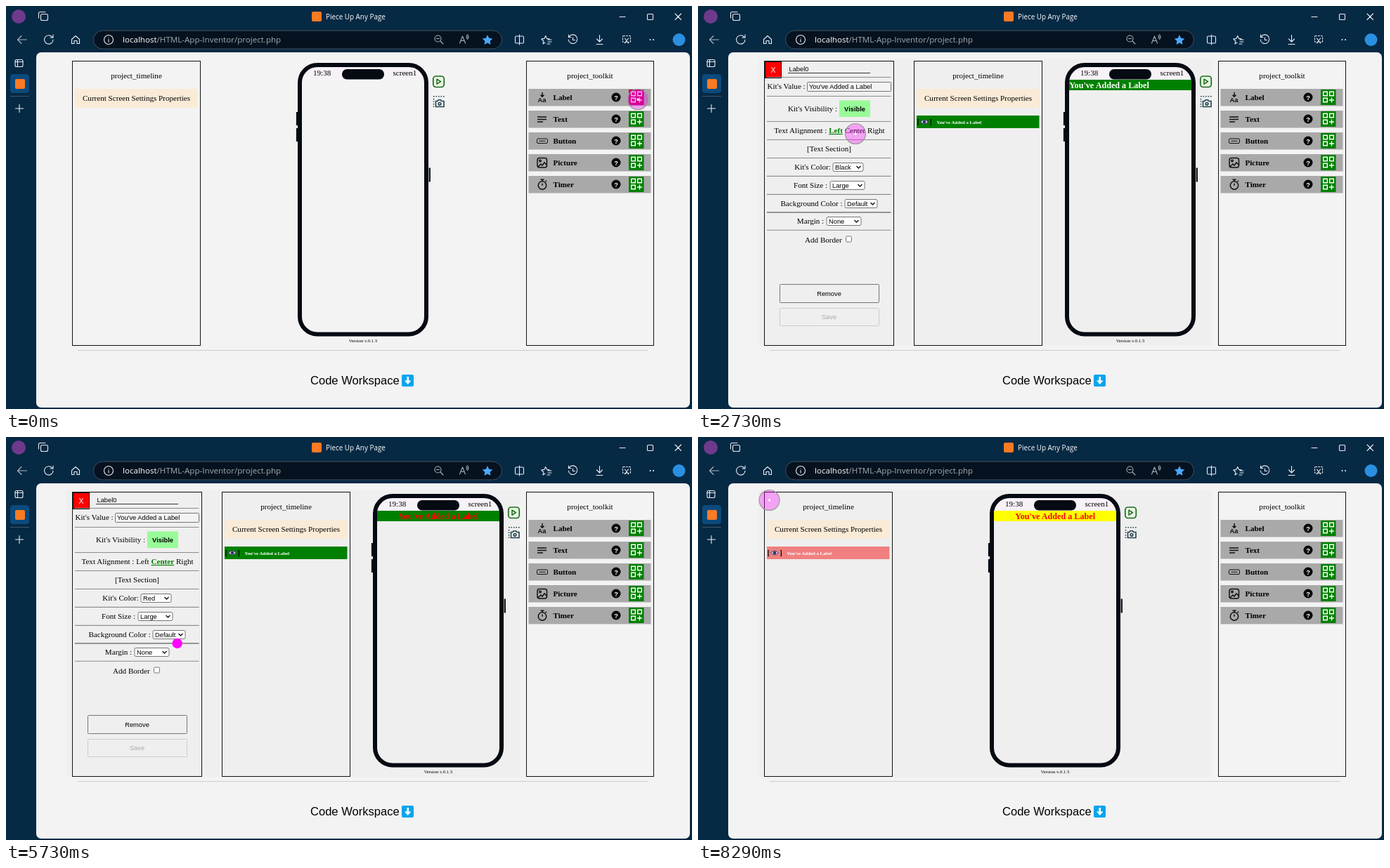
An HTML page for the animation above (8900 ms loop, 976 by 574 pixels).

```html
<!DOCTYPE html>
<html lang="en">
<head>
<meta charset="utf-8">
<title>Screen builder demo</title>
<style>
html, body { margin: 0; width: 100%; height: 100%; overflow: hidden; background: #062944; }
svg { display: block; width: 976px; height: 574px; }
text { white-space: pre; }
.ui { font-family: "Open Sans", "Noto Sans", sans-serif; fill: #fff; }
.serif { font: 11.1px "Liberation Serif", "Times New Roman", serif; }
.sans { font: 9.3px "Liberation Sans", Arial, sans-serif; }
.mid { text-anchor: middle; }
.b { font-weight: bold; }
.line { fill: none; stroke: #e8eef3; stroke-width: 1.1; stroke-linecap: round; stroke-linejoin: round; }
.dim { stroke: #aab3ba; }
.box { fill: none; stroke: #111; }
.rule { stroke: #8c8c8c; }
.field { fill: #fff; stroke: #767676; }
.focus { stroke: #101010; stroke-width: 2; }
.on { fill: green; font-weight: bold; text-decoration: underline; }
.menu { filter: drop-shadow(0 8px 9px rgba(0,0,0,.22)); }
</style>
</head>
<body>
<svg viewBox="0 0 976 574" xmlns="http://www.w3.org/2000/svg">
  <!-- browser frame -->
  <circle cx="18" cy="15" r="10" fill="#6e3a8c"/>
  <g class="line">
    <rect x="49.5" y="11.5" width="10" height="9" rx="2"/>
    <path d="M46.5 17v-6.500q0-2 2-2H56"/>
    <path d="M873 15.5h8M952 11l8.500 8.500m0-8.500-8.500 8.500"/>
    <rect x="912.5" y="11.5" width="8" height="8" rx="1"/>
    <path class="dim" d="M29.5 48h-13m5.500-5.500-5.500 5.500 5.500 5.500"/>
    <path d="M66 44.500a6.200 6.200 0 1 0 1 3.500M67 41v4h-4"/>
    <path d="M93.500 47.500l5.500-5 5.500 5v6h-3.500v-4h-4v4h-3.500z"/>
  </g>
  <rect x="435" y="8" width="14" height="14" rx="2" fill="#fb7a24"/>
  <text class="ui" x="455" y="19" font-size="9.9">Piece Up Any Page</text>
  <rect x="124.5" y="35" width="581" height="26" rx="13" fill="#06121f" stroke="#40515f"/>
  <text class="ui" x="166" y="52" font-size="11.6">localhost<tspan fill="#a3abb2">/HTML-App-Inventor/project.php</tspan></text>
  <g class="line">
    <circle cx="146" cy="48" r="6.5"/><path d="M146 47.500v3.500M146 45v.1"/>
    <g class="dim">
      <circle cx="614.5" cy="46.5" r="4.5"/><path d="M618 50l4 4M612.500 46.500h4"/>
      <path d="M645.500 53l4-10 4 10M647 49.500h5M655 42q2 2 0 4M656.500 40.500q3 3.500 0 7"/>
    </g>
    <rect x="724.5" y="43" width="12" height="10" rx="1.5"/><path d="M730.500 41v14"/>
    <path d="M767 52l-3 2 .8-4-3-3 4-.6 1.900-3.900 1.900 3.900 3.400.5M771 48h5m-5 3h5m-6 3h4"/>
    <path d="M801 44a6.300 6.300 0 1 1-.8 4M800.500 41v3.500h3.500M806.500 45v3.500h3"/>
    <path d="M844.500 41.500v9.500m-4-4 4 4 4-4M840 54.500h9"/>
    <rect x="877.5" y="42.5" width="11" height="9" rx="1" stroke-dasharray="2"/>
    <path d="M880.500 46l5 7m0-7-5 7"/>
    <path d="M916.500 48h9" stroke-width="2" stroke-dasharray=".1 4.400"/>
    <rect x="13" y="76.5" width="11" height="10" rx="2"/><path d="M16.500 76.500v10M13 79.500h11"/>
    <path d="M13.500 146h11M19 140.500v11"/>
  </g>
  <path d="M685 41l2.200 4.700 5.100.7-3.700 3.600.9 5.100-4.500-2.500-4.500 2.500.9-5.100-3.700-3.600 5.100-.7z" fill="#4aa8ff"/>
  <circle cx="957.5" cy="48" r="9" fill="#2a8fe0"/>
  <rect x="6" y="97" width="27" height="27" rx="4" fill="#0b4a7c"/>
  <rect x="13" y="104" width="14" height="14" rx="2" fill="#fb7a24"/>
  <path d="M6 128.500h27" stroke="#40566a"/>

  <!-- page -->
  <rect x="43" y="66" width="930" height="506" rx="7" fill="#f3f3f3"/>
  <rect id="tint" x="86" y="75" width="645" height="409" fill="#efefef"/>
  <path d="M102 490.500h811" stroke="#ccc"/>
  <text class="sans" x="433" y="539" style="font-size:16.56px">Code Workspace</text>
  <rect x="563" y="525" width="17" height="17" rx="2" fill="#06a5ee"/>
  <path d="M570.300 528h2.800v5.500h3.400l-4.800 5.500-4.800-5.500h3.400z" fill="#fff"/>

  <g id="timeline">
    <rect class="box" x="94.5" y="78.5" width="182" height="405"/>
    <text class="serif mid" x="185.5" y="103">project_timeline</text>
    <rect x="98" y="118" width="174.5" height="27" fill="#faebd7"/>
    <text class="serif mid" x="185.5" y="135">Current Screen Settings Properties</text>
    <g id="row">
      <rect id="rowFill" x="98" y="156" width="174.5" height="18"/>
      <text class="serif b" x="98.8" y="168" style="font-size:9.5px">[</text>
      <text class="serif b" x="116.5" y="168" style="font-size:9.5px">]</text>
      <path d="M103.500 165q5.500-6 11 0-5.500 6-11 0z" fill="#cdc4d8" stroke="#3a2c4c" stroke-width=".8"/>
      <circle cx="109" cy="165" r="2.2" fill="#27307a"/>
      <text class="serif b" x="126.5" y="167.5" fill="#fff" style="font-size:6.8px">You've Added a Label</text>
    </g>
  </g>

  <g id="phone">
    <path d="M421 105V99q0-12 14-12h146q14 0 14 12v6z" fill="#f7f1f8"/>
    <path d="M414 151v19m0 4v19M602.800 230.500v20" stroke="#060a12" stroke-width="2.2"/>
    <rect x="418" y="84" width="180" height="383.5" rx="25" fill="none" stroke="#060a12" stroke-width="6"/>
    <rect x="478" y="90" width="60" height="14.5" rx="7" fill="#060a12"/>
    <text class="serif" x="437" y="99">19:38</text>
    <text class="serif" x="550.5" y="99">screen1</text>
    <rect id="band" x="421" y="105" width="174" height="15"/>
    <text id="label" class="serif b" y="117" style="font-size:12.15px">You've Added a Label</text>
    <text class="serif mid" x="508" y="479" style="font-size:6.8px">Version v.0.1.5</text>
    <rect x="607.8" y="100" width="15.5" height="15.5" rx="4" fill="#e6f5e2" stroke="#1f6b1f" stroke-width="1.7"/>
    <path d="M613 104.200l5.500 3.500-5.500 3.500z" fill="none" stroke="#1f6b1f" stroke-width="1.5" stroke-linejoin="round"/>
    <g fill="none" stroke="#24424f" stroke-width="1.6">
      <path d="M608 128.800h16M608.500 132v13" stroke-dasharray="1.6 1.9"/>
      <path d="M611.500 135.500h2.500l1-1.800h3.500l1 1.800h3.500v8h-11.500z"/>
      <circle cx="617" cy="139.3" r="1.8"/>
    </g>
  </g>

  <g id="panel">
    <rect class="box" x="94.5" y="78.5" width="184" height="405"/>
    <rect x="95.5" y="79.5" width="23" height="23" fill="red" stroke="#111"/>
    <text class="sans mid" x="107" y="94.5" fill="#fff" style="font-size:10.5px">X</text>
    <text class="sans" x="129.5" y="93">Label0</text>
    <path d="M128 95.500h117" stroke="#333"/>
    <path class="rule" d="M98 101.500h176.500m0 27H98m0 36h176.500m0 26H98"/>
    <text class="serif" x="98.5" y="118">Kit's Value :</text>
    <rect class="field" x="155.5" y="108.5" width="119" height="13" rx="1" style="fill:#f3f3f3"/>
    <text class="sans" x="158" y="118">You've Added a Label</text>
    <text class="serif" x="128" y="149.5">Kit's Visibility :</text>
    <rect x="201" y="134.5" width="44" height="23.5" fill="#98fb98"/>
    <text class="sans mid b" x="223" y="149.5">Visible</text>
    <text class="serif mid" x="187" y="181">Text Alignment : <tspan id="left">Left</tspan> <tspan id="center">Center</tspan> Right</text>
    <text class="serif mid" x="186.5" y="206.5">[Text Section]</text>
    <g id="selects"></g>
    <text class="serif" x="152" y="336.5">Add Border</text>
    <rect class="field" x="210.5" y="328" width="8" height="8" rx="1.5"/>
    <rect x="116.5" y="396.5" width="141" height="26" rx="1" fill="#efefef" stroke="#767676"/>
    <text class="sans mid" x="186.5" y="412.5">Remove</text>
    <rect x="116.5" y="430.5" width="141" height="25" rx="1" fill="#efefef" stroke="#ccc"/>
    <text class="sans mid" x="186.5" y="446" fill="#aaa">Save</text>
  </g>

  <rect class="box" x="740.5" y="78.5" width="181" height="405"/>
  <text class="serif mid" x="831" y="103">project_toolkit</text>
  <g id="kits"></g>

  <g id="ripple">
    <circle r="14.5" fill="#f0f" fill-opacity=".32" stroke="#999" stroke-width="1.2"/>
    <circle r="1.7" fill="#fff"/>
  </g>
  <circle id="dot" r="7.2" fill="#f0f"/>
  <g id="menus"></g>
  <path id="arrow" d="M0 0v12.500l3-2.700 2 4.600 2.100-.9-2-4.500h4z" fill="#fff" stroke="#111" stroke-width=".8"/>
</svg>
<script>
const LOOP = 8900, TICK = 120, ITEM = 20.8;
const $ = id => document.getElementById(id);
const show = (el, on) => { el.style.display = on ? '' : 'none'; };
const place = (el, x, y) => el.setAttribute('transform', `translate(${x} ${y})`);
const within = (t, a, b) => t >= a && t < b;
const mix = (a, b, p) => a + (b - a) * p;
const clamp = p => Math.min(1, Math.max(0, p));
const ease = p => p < .5 ? 2 * p * p : 1 - 2 * (1 - p) ** 2;

// each select sits centred in the panel next to its caption
const PITCH = 25.8;
[["Kit's Color:", 'color', 44, 'Black'], ['Font Size :', 'size', 50, 'Large'],
  ['Background Color :', 'back', 47, 'Default'], ['Margin :', 'margin', 50, 'None']]
  .forEach(([caption, id, w, value], i) => {
    const g = document.createElementNS('http://www.w3.org/2000/svg', 'g');
    $('selects').append(g);
    g.innerHTML = `<path class="rule" d="M-88.500 0h176.500"/>
      <text class="serif" y="16.5">${caption}</text>
      <g><rect id="${id}Box" class="field" x=".5" y="7" width="${w - 1}" height="12" rx="2"/>
        <text id="${id}" class="sans" x="3.5" y="16.2">${value}</text>
        <path d="M${w - 10} 11.500l3 3 3-3" fill="none" stroke="#111" stroke-width="1.4"/></g>
      <path class="rule" d="M-88.500 ${PITCH}h176.500"/>`;
    const text = g.querySelector('text'), textWidth = text.getComputedTextLength();
    const start = -(textWidth + 3 + w) / 2;
    text.setAttribute('x', start);
    place(g.querySelector('g'), Math.round(start + textWidth + 3), 0);
    place(g, 186.5, Math.round(i * PITCH) + 216.5);
  });

const icons = {
  Label: '<path d="M763 123v6m-2.500-2.300 2.500 2.500 2.500-2.500"/><text class="sans b" x="756.5" y="137" stroke="none" fill="#111">Aa</text>',
  Text: '<path d="M756 127h13m-13 3.500h13m-13 3.500h8"/>',
  Button: '<rect x="755.5" y="127" width="15" height="6.5" rx="1.5" stroke-width="1"/><path d="M758.500 130.300h9" stroke-width="1"/>',
  Picture: '<rect x="756" y="123.5" width="13.5" height="13.5" rx="3"/><circle cx="760" cy="127.5" r="1.3"/><path d="M757 136l4-4 2 2 3-4 3.500 3.500"/>',
  Timer: '<circle cx="763" cy="131.5" r="5.7"/><path d="M760.500 123.200h5m-2.500 0v2.500m0 6v-3m4.500-2.500 1.500-1.500"/>'
};
$('kits').innerHTML = Object.entries(icons).map(([name, icon], i) =>
  `<g transform="translate(0 ${Math.round(i * 31.1)})">
    <rect x="743.5" y="118" width="174" height="24.5" fill="#a9a9a9"/>
    <g fill="none" stroke="#111" stroke-width="1.5">${icon}</g>
    <text class="serif b" x="778.5" y="133.5">${name}</text>
    <circle cx="868" cy="130" r="6.5" fill="#080808"/>
    <text class="sans mid b" x="868" y="133.5" fill="#fff">?</text>
    <rect class="add" x="886" y="119" width="21.5" height="22" fill="green"/>
    <path d="M889.700 122.200h5.600v5.600h-5.600zm9 0h5.600v5.600h-5.600zm-9 9h5.600v5.600h-5.600zM901.500 130.500v7M898 134h7"
      fill="none" stroke="#fff" stroke-width="1.4"/>
  </g>`).join('');
const addButton = document.querySelector('.add');

// drop-down lists; the arrow travels from one point to another between aim and hit
const menus = [
  { x: 192, y: 238.5, items: ['Black', 'Red', 'Green', 'Yellow', 'White'],
    open: 4070, aim: 4340, hit: 4730, close: 4980, from: [219, 247], to: [215, 263] },
  { x: 209, y: 291, items: ['Default', 'White', 'Green', 'Black', 'Yellow', 'Red'],
    open: 5980, aim: 6240, hit: 6510, close: 6770, from: [240, 332], to: [229, 375] }
];
for (const m of menus) {
  m.el = document.createElementNS('http://www.w3.org/2000/svg', 'g');
  m.el.setAttribute('class', 'menu');
  m.el.innerHTML = `<rect x="${m.x}" y="${m.y}" width="44.5" height="${m.items.length * ITEM}" rx="3" fill="#fff"/>
    <rect x="${m.x}" width="44.5" height="${ITEM}" fill="#767676"/>` +
    m.items.map((s, i) => `<text class="sans" x="${m.x + 3}" y="${m.y + i * ITEM + 14}">${s}</text>`).join('');
  $('menus').append(m.el);
}

function drawMenus(t) {
  show($('arrow'), false);
  for (const m of menus) {
    const open = within(t, m.open, m.close);
    show(m.el, open);
    if (!open) continue;
    const p = clamp((t - m.aim) / (m.hit - m.aim));
    const [x, y] = m.from.map((v, i) => mix(v, m.to[i], p));
    const pick = t < m.aim ? 0 : Math.floor((y - m.y) / ITEM);
    m.el.children[1].setAttribute('y', m.y + pick * ITEM);
    m.el.querySelectorAll('text').forEach((el, i) => el.setAttribute('fill', i === pick ? '#fff' : '#111'));
    show($('arrow'), t >= m.aim);
    place($('arrow'), x, y);
  }
}

// pointer moves: start, duration, x, y, press on arrival until the next move
const moves = [
  [0, 0, 899, 133, true],
  [120, 1080, 228, 184],
  [1350, 240, 220, 170, true],
  [2270, 0, 207, 195],
  [2590, 0, 224, 182, true],
  [3440, 0, 238, 198],
  [3590, 360, 223, 231, true],
  [4340, 0, 223, 238],
  [4980, 0, 211, 270],
  [4980, 840, 245, 295, true],
  [6240, 0, 245, 295],
  [6770, 0, 234, 381],
  [6790, 1080, 101.5, 90, true]
];

function drawPointer(t) {
  let x = 0, y = 0, pressed = false;
  for (const [start, span, toX, toY, press] of moves) {
    if (t < start) break;
    const elapsed = Math.floor((t - start) / TICK) * TICK;
    const p = span ? ease(clamp(elapsed / span)) : 1;
    x = mix(x, toX, p);
    y = mix(y, toY, p);
    pressed = press && p === 1;
  }
  show($('ripple'), pressed);
  show($('dot'), !pressed);
  place($('ripple'), x, y);
  place($('dot'), x, y);
}

const CORAL = [240, 128, 128], NAVY = [0, 0, 128], GREEN = [0, 128, 0];
const fades = [[1350, NAVY], [2120, GREEN], [7990, CORAL]];
function rowColor(t) {
  const rgb = fades.reduce((c, [start, to]) => {
    const p = Math.floor(clamp((t - start) / 2.4 / TICK) * 2) / 2;
    return c.map((v, i) => mix(v, to[i], p));
  }, CORAL);
  return `rgb(${rgb})`;
}

function draw(t) {
  const added = t >= 120, edited = t >= 1840, open = edited && t < 7990;
  const centered = t >= 3160, red = t >= menus[0].close, yellow = t >= menus[1].close;
  show($('tint'), edited);
  show($('panel'), open);
  place($('timeline'), open ? 213 : 0, 0);
  place($('phone'), open ? 107 : 0, 0);

  addButton.setAttribute('fill', added ? 'green' : '#c4005f');
  show($('row'), added);
  $('rowFill').setAttribute('fill', rowColor(t));

  const label = $('label');
  show(label, added);
  label.setAttribute('x', centered ? 508.2 : 421.2);
  label.setAttribute('text-anchor', centered ? 'middle' : 'start');
  label.setAttribute('fill', red ? 'red' : edited ? '#fff' : '#000');
  show($('band'), edited);
  $('band').setAttribute('fill', yellow ? 'yellow' : 'green');

  $('left').setAttribute('class', centered ? '' : 'on');
  $('center').setAttribute('class', centered ? 'on' : '');
  $('color').textContent = red ? 'Red' : 'Black';
  $('back').textContent = yellow ? 'Yellow' : 'Default';
  $('colorBox').classList.toggle('focus', within(t, menus[0].open, 5730));
  $('backBox').classList.toggle('focus', yellow);

  drawMenus(t);
  drawPointer(t);
}

function frame() {
  draw(performance.now() % LOOP);
  requestAnimationFrame(frame);
}
frame();
</script>
</body>
</html>
```
